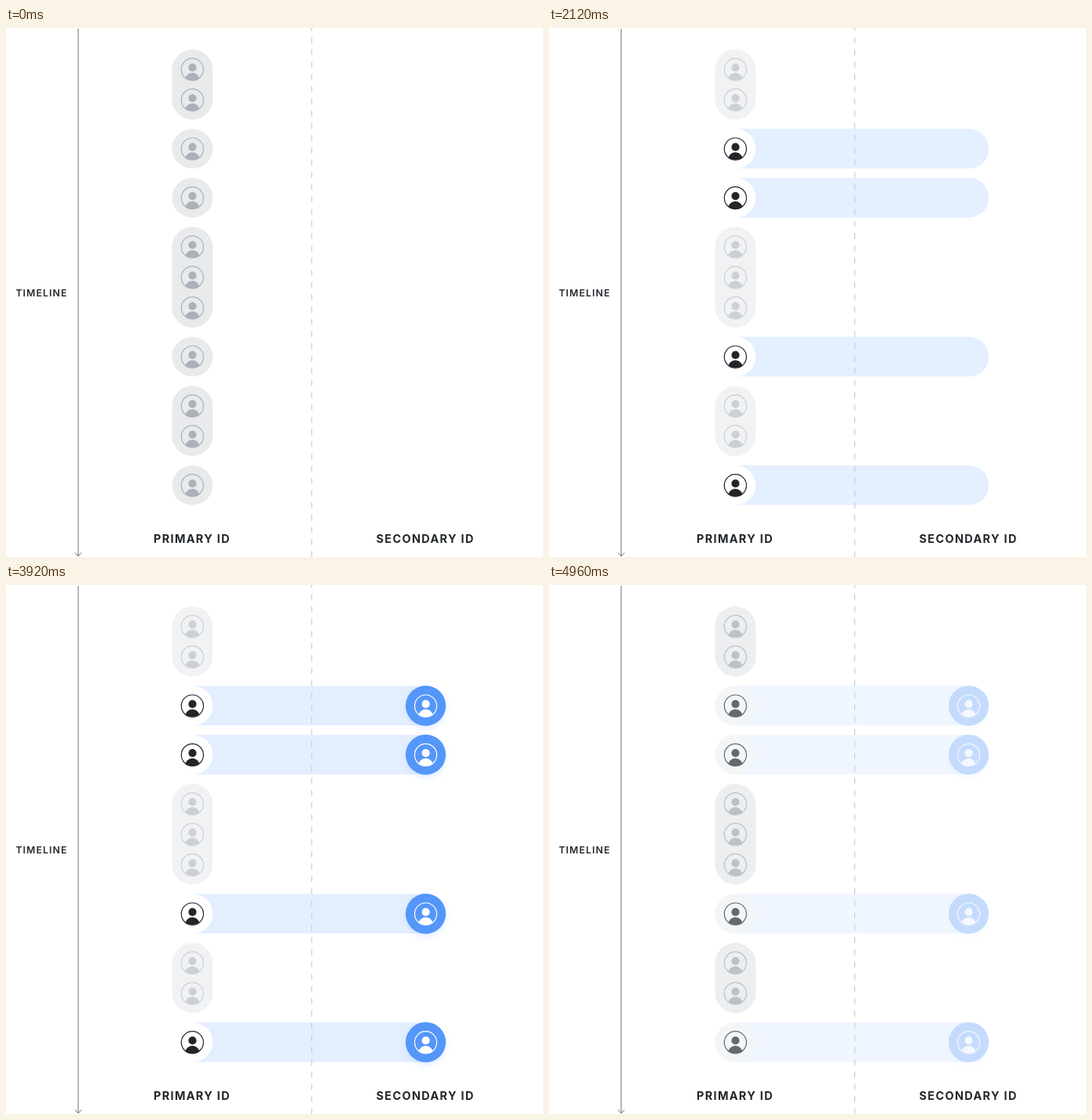
An HTML page for the animation above (5 s loop, 684 by 674 pixels).

```html
<!DOCTYPE html>
<html lang="en">
<head>
<meta charset="utf-8">
<title>Primary and secondary ID</title>
<style>
  html, body { margin: 0; width: 100%; height: 100%; overflow: hidden; background: #fff; }
  svg { display: block; width: 684px; height: 674px; }
  text { font-family: Inter, "Liberation Sans", sans-serif; fill: #22272b; }
  .axis { font-size: 12.2px; font-weight: 600; letter-spacing: 1.15px; }
  .column { font-size: 14.5px; font-weight: 700; letter-spacing: 1.3px; }
</style>
</head>
<body>
<svg viewBox="0 0 684 674">
  <defs>
    <clipPath id="ring"><circle r="14"/></clipPath>
    <filter id="blur" x="-50%" y="-50%" width="200%" height="200%">
      <feGaussianBlur stdDeviation="5"/>
    </filter>
    <g id="person">
      <circle r="14.1" fill="none" stroke="currentColor" stroke-width="1.2"/>
      <circle cx=".1" cy="-2.4" r="5.1" fill="currentColor"/>
      <ellipse cy="13.4" rx="9.3" ry="9.2" fill="currentColor" clip-path="url(#ring)"/>
    </g>
  </defs>
  <g id="bars"></g>
  <g id="groups"></g>
  <g id="singles"></g>
  <path d="M389.5 0V674" stroke="#c6cacf" stroke-dasharray="7.8 7.8" stroke-dashoffset="4"/>
  <g id="matches"></g>
  <path d="M92 1V673M88 668.5L92 673L96 668.5" fill="none" stroke="#6c7073"/>
  <text class="axis" x="12.4" y="341.6">TIMELINE</text>
  <text class="column" x="188" y="656">PRIMARY ID</text>
  <text class="column" x="471.5" y="656">SECONDARY ID</text>
</svg>
<script>
const LOOP = 5000, STEP = 40;
const LEFT = 237.4, RIGHT = 534.6, RX = 26, RY = 25.3;
const ICON_GAP = 38.9, ROW_GAP = 62.4;
const PILL = [232, 234, 236], WHITE = [255, 255, 255];
const GRAY = [171, 177, 185], DARK = [34, 38, 42];

const layer = id => document.getElementById(id);
const bars = layer("bars"), groups = layer("groups");
const singles = layer("singles"), matches = layer("matches");

const person = (x, y) => `<use href="#person" x="${x}" y="${y + 0.3}"/>`;
const pill = (y, count, fill) =>
  `<rect x="${LEFT - RX}" y="${y - RY}" width="${2 * RX}" height="${2 * RY + (count - 1) * ICON_GAP}"
    rx="${RX}" ry="${count > 1 ? RX : RY}" fill="${fill}"/>`;

function bar(y) {
  const end = RIGHT + 25.6;
  return `<path d="M${LEFT} ${y - RY}H${end - RY}a${RY} ${RY} 0 0 1 0 ${2 * RY}H${LEFT}Z" fill="#e3eeff"/>`;
}

function match(y) {
  return `<circle cx="${RIGHT}" cy="${y + 4}" r="24" fill="#5596f9" opacity=".22" filter="url(#blur)"/>
    <circle cx="${RIGHT}" cy="${y}" r="25.6" fill="#5596f9"/>
    <g color="#fff">${person(RIGHT, y)}</g>`;
}

// Rows from top to bottom: how many people share each primary ID
let y = 52.5;
const html = { bars: "", groups: "", singles: "", matches: "" };
for (const count of [2, 1, 1, 3, 1, 2, 1]) {
  if (count > 1) {
    html.groups += pill(y, count, "#e8eaec");
    for (let i = 0; i < count; i++) html.groups += person(LEFT, y + i * ICON_GAP);
  } else {
    html.bars += bar(y);
    html.singles += pill(y, 1, "inherit") + person(LEFT, y);
    html.matches += match(y);
  }
  y += (count - 1) * ICON_GAP + ROW_GAP;
}
for (const id in html) layer(id).innerHTML = html[id];
groups.setAttribute("color", "#abb1b9");
for (const rect of singles.querySelectorAll("rect")) rect.removeAttribute("fill");

const clamp = v => Math.min(1, Math.max(0, v));
const mix = (a, b, p) => `rgb(${a.map((v, i) => Math.round(v + (b[i] - v) * p))})`;

// cubic-bezier(0, 0, .58, 1)
function easeOut(x) {
  let lo = 0, hi = 1;
  for (let i = 0; i < 20; i++) {
    const s = (lo + hi) / 2;
    if (1.74 * (1 - s) * s * s + s * s * s < x) lo = s; else hi = s;
  }
  return lo * lo * (3 - 2 * lo);
}
const enter = (t, start) => easeOut(clamp((t - start) / 400));

function render(t) {
  const keep = 1 - clamp((t - 4710) / 520);
  const select = enter(t, 700) * keep;
  singles.setAttribute("fill", mix(PILL, WHITE, select));
  singles.setAttribute("color", mix(GRAY, DARK, select));
  groups.setAttribute("opacity", 1 - 0.4 * select);
  bars.setAttribute("opacity", enter(t, 1800) * keep);
  matches.setAttribute("opacity", enter(t, 2760) * keep * keep);
}

const origin = performance.now();
function tick() {
  const t = (performance.now() - origin) % LOOP;
  render(Math.floor(t / STEP) * STEP);
  requestAnimationFrame(tick);
}
tick();
</script>
</body>
</html>
```
